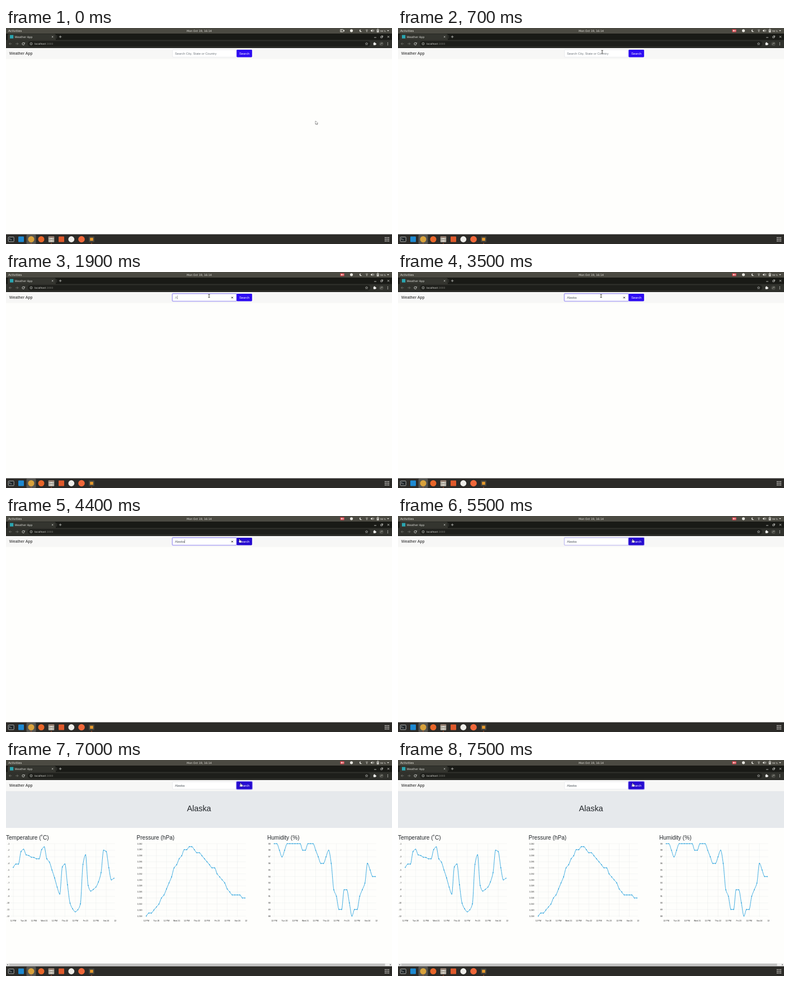
These frames come from a looping animation (690x388 px, 8 s). An HTML page with a canvas:

```html
<!DOCTYPE html>
<html lang="en">
<head>
<meta charset="utf-8">
<title>Weather App</title>
<style>
html, body { margin: 0; width: 100%; height: 100%; overflow: hidden; background: #fefefc; }
canvas { display: block; width: 690px; height: 388px; }
</style>
</head>
<body>
<canvas id="stage"></canvas>
<script>
const W = 690, H = 388, LOOP = 8000, STEP = 100;
const canvas = document.getElementById('stage');
const ctx = canvas.getContext('2d');
const dpr = window.devicePixelRatio || 1;
canvas.width = W * dpr;
canvas.height = H * dpr;

const PAGE = '"Liberation Sans", Arial, sans-serif';
const SHELL = '"DejaVu Sans", sans-serif';

const temps = [-4.6, -4.1, -4.1, -2.2, -1.85, -2.7, -2.8, -3.05, -3.1, -3.3,
  -3.3, -1.9, -1.5, -3.3, -3.8, -5, -6.2, -7.6, -8.65, -4.55,
  -4.1, -7.25, -10.05, -10.9, -11.35, -11.05, -10.15, -4.15, -2.7, -7.35,
  -8.2, -7.95, -7.6, -6.8, -5.4, -2, -2.2, -4.65, -6.5, -6.25];
const pressures = [18, 19, 19, 20, 21, 22, 24, 25, 27, 29, 31, 34, 35, 37, 38, 40, 40, 41, 41, 40,
  39, 39, 38, 37, 36, 35, 34, 34, 32, 31, 30, 29, 27, 26, 25, 25, 25, 25, 24, 24].map(v => v + 1000);
const humidity = [...'9987899999988999876678621992208991236544'].map((d, i) =>
  (i === 30 || d > 2 || i < 23) ? 90 + +d : 90 + +d);
// Digits below ninety are kept as a short override.
for (const [i, v] of [[23, 92], [24, 91], [25, 89], [26, 89], [27, 92], [28, 92], [29, 90], [30, 88], [31, 89], [32, 89]]) humidity[i] = v;

const charts = [
  { title: 'Temperature (˚C)', left: 0, x: 13, dx: 4.615, labelX: 6.2, max: -1, min: -12, tick: 1, data: temps },
  { title: 'Pressure (hPa)', left: 233.5, x: 250.8, dx: 4.52, labelX: 243.5, max: 1042, min: 1018, tick: 2, data: pressures },
  { title: 'Humidity (%)', left: 467, x: 479.5, dx: 4.63, labelX: 472.6, max: 99, min: 88, tick: 1, data: humidity }
];
const days = ['Tue 20', 'Wed 21', 'Thu 22', 'Fri 23', 'Sat 24'];

const clamp = v => Math.max(0, Math.min(1, v));
const mix = (a, b, p) => a + (b - a) * p;
const easeOut = p => 1 - (1 - p) ** 2;
const easeInOut = p => p * p * (3 - 2 * p);

function rect(x, y, w, h, color, r = 0) {
  ctx.fillStyle = color;
  ctx.beginPath();
  ctx.roundRect(x, y, w, h, r);
  ctx.fill();
}

function frame(x, y, w, h, color, width, r = 0) {
  ctx.strokeStyle = color;
  ctx.lineWidth = width;
  ctx.beginPath();
  ctx.roundRect(x, y, w, h, r);
  ctx.stroke();
}

function dot(x, y, r, color) {
  ctx.fillStyle = color;
  ctx.beginPath();
  ctx.arc(x, y, r, 0, Math.PI * 2);
  ctx.fill();
}

function arc(x, y, r, a, b, color, width) {
  ctx.strokeStyle = color;
  ctx.lineWidth = width;
  ctx.beginPath();
  ctx.arc(x, y, r, a, b);
  ctx.stroke();
}

function line(color, width, ...pts) {
  ctx.strokeStyle = color;
  ctx.lineWidth = width;
  ctx.beginPath();
  for (let i = 0; i < pts.length; i += 2) ctx.lineTo(pts[i], pts[i + 1]);
  ctx.stroke();
}

function poly(color, ...pts) {
  ctx.fillStyle = color;
  ctx.beginPath();
  for (let i = 0; i < pts.length; i += 2) ctx.lineTo(pts[i], pts[i + 1]);
  ctx.closePath();
  ctx.fill();
}

function text(str, x, y, size, color, family = PAGE, align = 'left', weight = 400) {
  ctx.font = `${weight} ${size}px ${family}`;
  ctx.textAlign = align;
  ctx.fillStyle = color;
  ctx.fillText(str, x, y);
}

function cross(x, y, r, color, width) {
  line(color, width, x - r, y - r, x + r, y + r);
  line(color, width, x - r, y + r, x + r, y - r);
}

function topBar(recording) {
  const ink = '#e6e5df';
  rect(0, 0, W, 10, '#4b4a42');
  text('Activities', 4, 6.8, 5.3, ink, SHELL);
  text('Mon Oct 19, 16:14', 345.5, 6.8, 4.85, ink, SHELL, 'center');
  if (recording) {
    rect(597.3, 2.3, 7.4, 5.2, '#d9434c', 1);
    rect(598.8, 3.7, 2.8, 2.4, '#f3d8d6');
    poly('#f3d8d6', 602, 4.9, 603.7, 3.6, 603.7, 6.2);
  } else {
    frame(597.7, 2.6, 5, 4.4, ink, 0.8);
    line(ink, 0.8, 599.5, 2.6, 599.5, 7);
    poly(ink, 602.7, 4.8, 605, 3, 605, 6.8);
  }
  dot(617.5, 4.8, 2.6, ink);
  dot(634.2, 4.8, 2.4, ink);
  dot(635.5, 4.1, 2.1, '#4b4a42');
  arc(645, 6.6, 3.6, -2.2, -0.94, '#a9a89f', 0.8);
  arc(645, 6.6, 2, -2.2, -0.94, ink, 0.8);
  dot(645, 6.5, 0.7, ink);
  poly(ink, 652, 3.9, 653.2, 3.9, 654.9, 2.3, 654.9, 7.3, 653.2, 5.8, 652, 5.8);
  arc(655, 4.8, 1.5, -0.9, 0.9, ink, 0.6);
  arc(655, 4.8, 2.7, -0.9, 0.9, ink, 0.6);
  frame(663, 2.6, 3.3, 5, ink, 0.8, 0.5);
  rect(664, 1.6, 1.4, 1, ink);
  rect(663.8, 4, 1.8, 3, ink);
  text('98 %', 669, 6.5, 4, ink, SHELL);
  poly(ink, 681.2, 4, 684.8, 4, 683, 6);
}

function browser() {
  const ink = '#dcddd8', dim = '#80817b';
  rect(0, 10, W, 12, '#191a16');
  rect(3, 10.6, 86, 12, '#34352f', [3, 3, 0, 0]);
  rect(7, 12.6, 6.2, 6.2, '#2aa5b0');
  text('Weather App', 15.6, 17.6, 4.9, ink, SHELL);
  cross(83.2, 15.8, 1.3, ink, 0.7);
  line('#595a54', 0.5, 90.5, 13, 90.5, 19);
  line(ink, 0.7, 94.8, 15.8, 99.4, 15.8);
  line(ink, 0.7, 97.1, 13.5, 97.1, 18.1);
  line(ink, 0.8, 658, 17, 662, 17);
  frame(669.8, 15, 2.7, 2.7, ink, 0.7);
  line(ink, 0.7, 671, 14, 673.6, 14, 673.6, 16.6);
  cross(683.5, 15.8, 1.6, ink, 0.8);

  rect(0, 21.5, W, 14.5, '#30312c');
  rect(39, 23.4, 612, 9.8, '#1e1f1b', 4.9);
  rect(0, 34.9, W, 1, '#1a1b17');
  for (const [x, s] of [[8, -1], [19.5, 1]]) {
    line(dim, 0.7, x - 2.3, 28.3, x + 2.3, 28.3);
    line(dim, 0.7, x + s * 0.3, 26.2, x + s * 2.3, 28.3, x + s * 0.3, 30.4);
  }
  arc(31, 28.4, 2.1, 0.3, 5.4, ink, 0.9);
  poly(ink, 33.7, 25.8, 33.7, 28.2, 31.3, 28.2);
  arc(45, 28.3, 2.1, 0, 7, ink, 0.6);
  line(ink, 0.6, 45, 28, 45, 29.5);
  dot(45, 27.1, 0.35, ink);
  text('localhost', 51, 30.1, 4.5, ink, SHELL);
  text(':3000', 71.3, 30.1, 4.5, dim, SHELL);
  const star = [];
  for (let i = 0; i < 11; i++) {
    const r = i % 2 ? 1.1 : 2.5, a = i * Math.PI / 5 - Math.PI / 2;
    star.push(644.6 + r * Math.cos(a), 28.4 + r * Math.sin(a));
  }
  line(ink, 0.5, ...star);
  rect(656.8, 26.8, 4, 4, '#f2f2ee', 0.5);
  dot(658.6, 26.6, 1, '#f2f2ee');
  dot(661.1, 28.8, 1, '#f2f2ee');
  dot(671, 28.4, 3.7, '#494a44');
  line('#b9bab2', 0.8, 669, 29.6, 671.2, 27.4, 673.3, 27.2);
  for (let i = -1; i < 2; i++) dot(682.4, 28.4 + i * 2, 0.65, ink);
}

function dock() {
  rect(0, 370.4, W, 18, '#2c2b28');
  rect(36.5, 371, 17, 17, '#55544f', 1.5);
  rect(4, 375.2, 10.4, 8.8, '#22282b', 1);
  frame(4.2, 375.4, 10, 8.4, '#c9cbc6', 0.8, 1);
  line('#e6e7e3', 0.7, 5.8, 377.5, 7.3, 378.8, 5.8, 380.1);
  line('#e6e7e3', 0.7, 8, 380.3, 10, 380.3);
  rect(22, 374.6, 10, 10, '#1e8ad2', 1);
  dot(45, 379.5, 5.5, '#d9a23c');
  dot(63, 379.5, 5.5, '#e8662a');
  rect(75.8, 374.3, 10.4, 10.4, '#bdb8ad', 1);
  rect(75.8, 374.3, 10.4, 2.4, '#8d7567', 1);
  line('#77736a', 0.6, 76, 380.2, 86, 380.2);
  rect(79, 377.8, 4, 1, '#f1eee7');
  rect(79, 382, 4, 1, '#f1eee7');
  rect(94, 374.6, 10, 10, '#df5a2c', 1);
  dot(116.8, 379.5, 5.4, '#efeeea');
  dot(135, 379.5, 5.8, '#f0683a');
  rect(148, 374.5, 10, 10, '#48463f', 1);
  rect(150.2, 376.8, 5.6, 5.4, '#e69a2e');
  for (const x of [45, 81, 153]) dot(x, 386.7, 0.8, '#dc5b2e');
  for (let i = 0; i < 9; i++) rect(677.2 + i % 3 * 3, 375.7 + Math.floor(i / 3) * 3, 1.7, 1.7, '#e9e8e3', 0.3);
}

function typed(t) {
  if (t < 1900) return '';
  if (t < 2200) return 'A';
  if (t < 2300) return 'Al';
  if (t < 2400) return 'Ala';
  return t < 2900 ? 'Alas' : 'Alaska';
}

function caretOn(t) {
  if (t < 1100 || t >= 5500) return false;
  if (t < 1900) return t < 1600;
  return t < 3500 || (t >= 4000 && t < 4500) || t >= 5000;
}

function navbar(t, pointer) {
  rect(0, 36, W, 19.7, '#f7f7f6');
  text('Weather App', 5.8, 48, 7.19, '#1c1c1c');

  const focus = clamp((t - 900) / 200) * (1 - clamp((t - 5400) / 200));
  rect(297.4, 39, 114.8, 13.4, '#fff', 1.4);
  frame(297.5, 39.1, 114.5, 13.2, '#ced2d8', 0.4, 1.4);
  if (focus) {
    ctx.globalAlpha = focus;
    frame(297, 38.6, 115.5, 14.2, 'rgba(90,70,245,.42)', 1.1, 1.8);
    frame(297.5, 39.1, 114.5, 13.2, '#8d80f4', 0.5, 1.4);
    ctx.globalAlpha = 1;
  }
  const str = typed(t);
  if (str) text(str, 302, 47.6, 5.75, t < 2000 ? '#8b8f94' : '#495057');
  else text('Search City, State or Country', 302, 47.6, 5.75, '#6f767d');
  if (str && focus > 0.5) cross(404.4, 46, 1.4, '#151518', 1);
  if (caretOn(t)) {
    ctx.font = `5.75px ${PAGE}`;
    rect(302.1 + ctx.measureText(str).width, 42.2, 0.45, 6.6, '#30343a');
  }

  const hover = pointer.x >= 412 && pointer.y < 53;
  const ring = clamp((t - 5400) / 200);
  if (ring) frame(411.7, 38.4, 28.7, 14.6, `rgba(70,45,245,${0.55 * ring})`, 1.2, 1.9);
  rect(412.2, 39, 27.7, 13.4, hover ? '#260bd0' : '#2e0cf2', 1.4);
  text('Search', 426.1, 47.6, 5.75, '#fff', PAGE, 'center');
}

// Monotone cubic through evenly spaced points.
function curve(xs, ys) {
  const n = xs.length, h = xs[1] - xs[0];
  const d = ys.slice(1).map((y, i) => (y - ys[i]) / h);
  const m = ys.map((_, i) => {
    if (i === 0) return d[0];
    if (i === n - 1) return d[n - 2];
    const a = d[i - 1], b = d[i];
    return a * b > 0 ? 2 * a * b / (a + b) : 0;
  });
  ctx.beginPath();
  ctx.moveTo(xs[0], ys[0]);
  for (let i = 1; i < n; i++) {
    ctx.bezierCurveTo(xs[i - 1] + h / 3, ys[i - 1] + m[i - 1] * h / 3,
      xs[i] - h / 3, ys[i] - m[i] * h / 3, xs[i], ys[i]);
  }
  ctx.stroke();
}

function chart(c) {
  const top = 150.3, bottom = 280.3, grid = '#e6e7e8', blue = '#2ba3de';
  const yOf = v => top + (c.max - v) / (c.max - c.min) * (bottom - top);
  const right = c.x + 39.4 * c.dx;
  text(c.title, c.left, 143, 10.06, '#212529');
  for (let v = c.max; v >= c.min; v -= c.tick) {
    const y = yOf(v);
    line(grid, 0.4, c.labelX + 1.2, y, right, y);
    text(v.toLocaleString('en-US'), c.labelX, y + 1.25, 3.55, '#222', PAGE, 'right');
  }
  for (let i = 0; i < 10; i++) {
    const x = c.x + i * 4 * c.dx;
    line(grid, 0.4, x, top, x, bottom + 1.5);
    text(i % 2 ? days[(i - 1) / 2] : '12 PM', x, 290, 3.55, '#222', PAGE, 'center');
  }
  text('12', right + 0.3, 290, 3.55, '#222', PAGE, 'center');
  const xs = c.data.map((_, i) => c.x + i * c.dx), ys = c.data.map(yOf);
  ctx.strokeStyle = blue;
  ctx.lineWidth = 0.9;
  curve(xs, ys);
  xs.forEach((x, i) => dot(x, ys[i], 0.9, blue));
}

function results() {
  rect(0, 55.7, W, 66.3, '#e6e9ec');
  text('Alaska', 345, 92.4, 14.4, '#212529', PAGE, 'center');
  charts.forEach(chart);
  rect(0, 365, W, 5.4, '#f0f0ef');
  rect(5.6, 365.7, 672, 4, '#c2c2c1');
  poly('#55565a', 1.6, 367.7, 3.6, 366.3, 3.6, 369.1);
  poly('#55565a', 688.4, 367.7, 686.4, 366.3, 686.4, 369.1);
}

function pointerAt(t) {
  const a = easeOut(clamp(t / 700)), b = clamp((t - 900) / 300);
  const c = easeInOut(clamp((t - 3900) / 500)), d = clamp((t - 4600) / 700);
  const p = { x: mix(553, 365, a) - 2 * b + 55 * c + 2 * d, y: mix(167, 43, a) + c };
  p.kind = p.y > 53 ? 'arrow' : p.x >= 412 ? 'hand' : 'beam';
  return p;
}

function outline(pts, fill) {
  ctx.beginPath();
  for (let i = 0; i < pts.length; i += 2) ctx.lineTo(pts[i], pts[i + 1]);
  ctx.closePath();
  ctx.lineJoin = 'round';
  ctx.lineWidth = 0.9;
  ctx.strokeStyle = fill === '#fff' ? '#151515' : '#fff';
  ctx.stroke();
  ctx.fillStyle = fill;
  ctx.fill();
}

function drawPointer({ x, y, kind }) {
  ctx.save();
  ctx.translate(x, y);
  if (kind === 'arrow') {
    outline([0.3, 0, 0.3, 5.6, 1.6, 4.5, 2.5, 6.6, 3.4, 6.2, 2.6, 4.2, 4.3, 4.1], '#fff');
  } else if (kind === 'beam') {
    for (const [color, w] of [['#fff', 1.6], ['#222', 0.8]]) {
      line(color, w, -1.6, -2.7, 1.6, -2.7);
      line(color, w, 0, -2.7, 0, 2.7);
      line(color, w, -1.6, 2.7, 1.6, 2.7);
    }
  } else {
    outline([-1, -2.2, 0, -2.2, 0.3, 0, 2.7, 0.6, 2.7, 2.5, 2, 3.7, -0.6, 3.7, -2, 1.5, -1.5, 0.9, -0.7, 1.4], '#fff');
  }
  ctx.restore();
}

function draw(now) {
  const t = Math.floor(now % LOOP / STEP) * STEP;
  const pointer = pointerAt(t);
  ctx.setTransform(dpr, 0, 0, dpr, 0, 0);
  rect(0, 0, W, H, '#fefefc');
  topBar(t >= 100);
  browser();
  navbar(t, pointer);
  if (t >= 7000) results();
  dock();
  drawPointer(pointer);
}

const start = performance.now();
function tick() {
  draw(performance.now() - start);
  requestAnimationFrame(tick);
}
tick();
</script>
</body>
</html>
```
